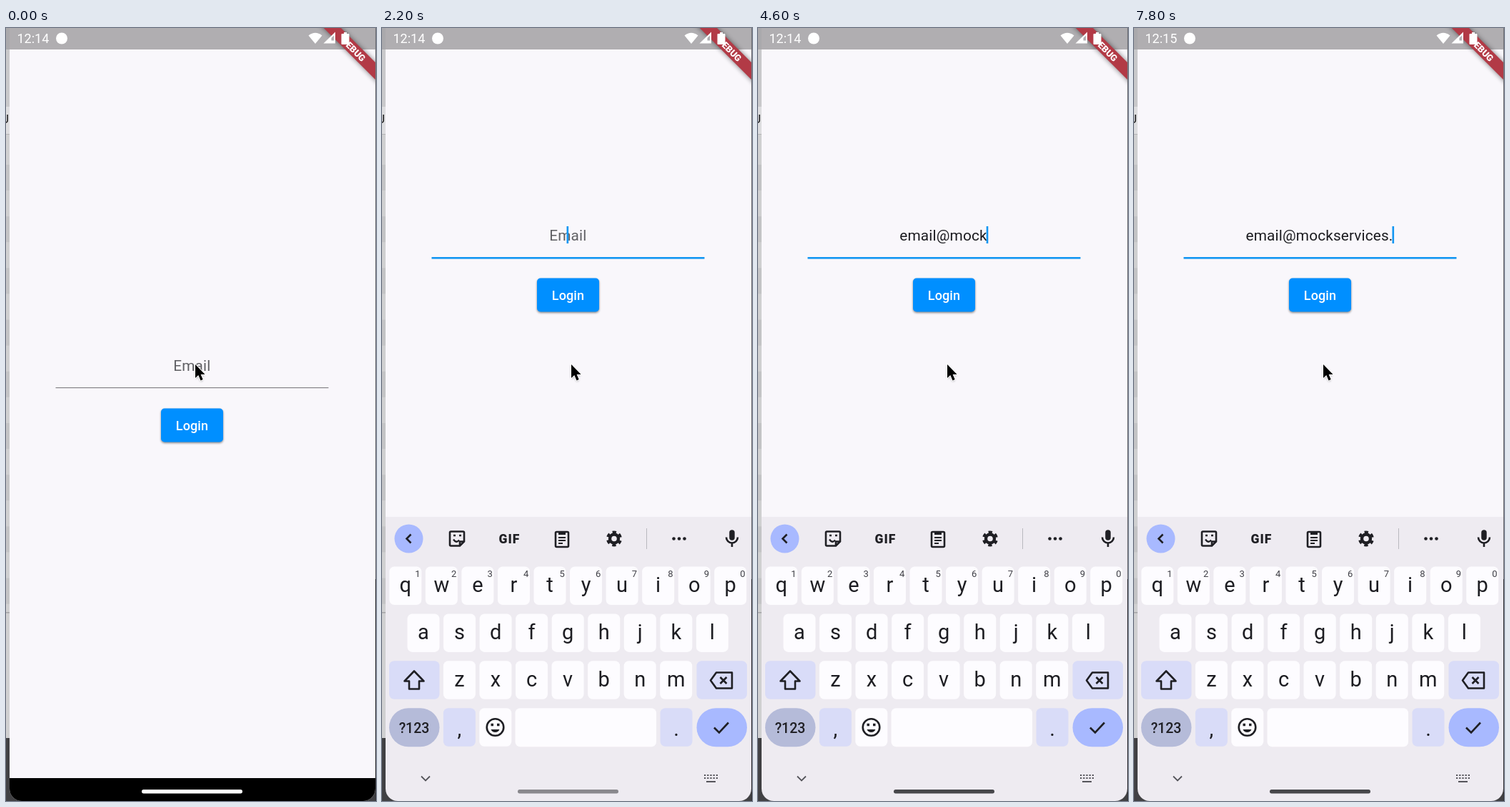
These frames come from a looping animation (518x1080 px, 8 s). An HTML page:

```html
<!DOCTYPE html>
<html lang="en">
<head>
<meta charset="utf-8">
<title>Login screen</title>
<style>
html, body { margin: 0; width: 100%; height: 100%; overflow: hidden; background: #d0d0d1; }
svg { display: block; width: 518px; height: 1080px; }
text { font-family: Roboto, sans-serif; }
.mid { text-anchor: middle; }
.line { fill: none; stroke: #1f1f24; stroke-width: 2.6; }
.field { font-size: 20.8px; letter-spacing: .15px; text-anchor: middle; }
.key { font-size: 29px; fill: #1d1d22; text-anchor: middle; }
.hint { font-size: 13px; fill: #3f3f46; text-anchor: middle; }
.word { font-size: 23.7px; fill: #2a2a30; text-anchor: middle; }
</style>
</head>
<body>
<svg viewBox="0 0 518 1080">
  <defs>
    <clipPath id="phone"><rect x="5" y="-30" width="512" height="1110" rx="17"/></clipPath>
    <filter id="soft" x="-30%" y="-60%" width="160%" height="220%"><feGaussianBlur stdDeviation="1.6"/></filter>
    <filter id="glow" x="-30%" y="-100%" width="160%" height="300%"><feGaussianBlur stdDeviation="3.5"/></filter>
  </defs>
  <g id="backdrop"></g>
  <g clip-path="url(#phone)">
    <rect x="5" width="512" height="1080" fill="#f9f7fb"/>
    <rect x="5" width="512" height="30" fill="#b0aeb1"/>
    <g id="form">
      <text id="label" class="field" x="260.3" y="478.5" fill="#606064">Email</text>
      <text id="entry" class="field" x="259.5" y="478.5" fill="#1c1c20"></text>
      <rect id="compose" y="480.5" height="1.3" fill="#1c1c20"/>
      <rect id="caret" y="459" width="2.6" height="24" fill="#1296f2"/>
      <rect id="rule" x="69.5" width="382"/>
      <rect x="217" y="533" width="87" height="47" rx="5" fill="#000" opacity=".45" filter="url(#soft)"/>
      <rect x="217" y="531.5" width="87" height="47" rx="5" fill="#008fff"/>
      <text class="mid" x="260.5" y="561.5" font-size="18" font-weight="500" letter-spacing=".1" fill="#fff">Login</text>
    </g>
    <rect x="5" y="1048" width="512" height="32" fill="#000"/>
    <g id="keyboard"></g>
    <g id="nav" fill="none" stroke="#55555b" stroke-width="1.8">
      <path d="M55 1045.5l6 6 6-6"/>
      <path d="M451 1044h19M451 1048h19" stroke-dasharray="2.2 2"/>
      <path d="M454 1053h13"/>
    </g>
    <rect id="handle" x="190" y="1064" width="141" height="5.5" rx="2.7"/>
    <g transform="translate(517 0) rotate(45)">
      <rect x="-60" y="34" width="120" height="17" fill="#000" opacity=".5" filter="url(#glow)"/>
      <rect x="-60" y="34" width="120" height="17" fill="#b23a46"/>
      <text class="mid" y="47.2" font-size="12.7" font-weight="900" fill="#fff">DEBUG</text>
    </g>
    <g fill="#fff">
      <text id="clock" x="15.5" y="21" font-size="18"></text>
      <circle cx="78" cy="14.5" r="8"/>
      <path d="M423.5 10.5q9.5-7.5 19 0L433 22z"/>
      <path d="M444.5 21.5L461 5.5v16z"/>
      <path d="M455.5 14l3.5-3.5v7h-3.5z" fill="#b0aeb1"/>
      <path d="M473 6h4v2h2.500q1 0 1 1v13q0 1-1 1h-9q-1 0-1-1v-13q0-1 1-1h2.500z"/>
    </g>
  </g>
  <rect x="517" width="1" height="770" fill="#737378"/>
  <rect x="517" y="770" width="1" height="310" fill="#303034"/>
  <g transform="translate(265 470)">
    <path id="arrow" d="M0 1.500v19l4.300-4 3.200 7.500 3.200-1.400-3.100-7.200h6z" opacity=".35" filter="url(#soft)"/>
    <path d="M0 0v19l4.300-4 3.200 7.500 3.200-1.400-3.100-7.200h6z" stroke="#fff" stroke-width="2" paint-order="stroke"/>
  </g>
</svg>
<script>
const $ = id => document.getElementById(id);
const rect = (x, y, w, h, fill, r = 0) =>
  `<rect x="${x}" y="${y}" width="${w}" height="${h}" rx="${r}" fill="${fill}"/>`;
const label = (cls, x, y, s) => `<text class="${cls}" x="${x}" y="${y}">${s}</text>`;
const at = (x, y, body) => `<g class="line" transform="translate(${x} ${y})">${body}</g>`;
const WHITE = '#fdfcff', LILAC = '#d9dcf8', BLUE = '#a8b9ff', INK = '#1f1f24';
const PITCH = 50.55;

// Window edge behind the phone
function backdrop() {
  let s = rect(0, 0, 8, 30, '#aaa9ac') + rect(0, 30, 8, 80, '#c9c9cb') +
    rect(0, 110, 8, 38, '#dddddf') + rect(0, 148, 8, 1, '#b5b5b7');
  for (let y = 191; y < 816; y += 72.2) s += rect(0, y, 8, 36, '#c4c4c6');
  s += rect(0, 816, 8, 1.5, '#a4a4a6') + rect(0, 992, 518, 88, '#414144');
  return s + '<text x="-6.500" y="133" font-size="16" fill="#111">U</text>';
}

function key(x, row, char, fill = WHITE, drop = 0) {
  const y = 752.5 + row * 65.9;
  return rect(x - 22.5, y, 45, 53.5, fill, 7) + label('key', x, y + 35.5 + drop, char);
}

function keyRow(chars, x, row) {
  return [...chars].map((c, i) => key(x + i * PITCH, row, c)).join('');
}

function toolbar() {
  return at(37.5, 713.5, '<path d="M3-6l-6 6 6 6"/>') +
    at(105, 713.5, `<path d="M-8.500-10h17q1.500 0 1.500 1.500V4l-6 6h-12.500q-1.500 0-1.500-1.500v-17q0-1.500 1.500-1.500zM10 4h-6v6"/>
      <path d="M-5 1q4 6 8 1M-5-4.500h3M3-4.500h3" stroke-width="2.300"/>`) +
    `<text class="mid" x="178.500" y="719.500" font-size="17.500" font-weight="900" letter-spacing="1" fill="${INK}">GIF</text>` +
    at(252, 714, `<rect x="-9" y="-10" width="18" height="21" rx="1.500"/>
      <path d="M-5-8.500h10" stroke-width="5"/><path d="M-5-2h10M-5 2h10M-5 6h6" stroke-width="2"/>`) +
    at(325, 713.5, `<circle r="6" stroke-width="4.400"/>
      <circle r="9" stroke-width="4" stroke-dasharray="5 4.425" stroke-dashoffset="2.500" transform="rotate(30)"/>`) +
    rect(370, 699, 1, 29, '#b9b8bf') +
    [-7.5, 0, 7.5].map(d => `<circle cx="${416 + d}" cy="713.5" r="2.3" fill="${INK}"/>`).join('');
}

function suggestions() {
  const mail = `<g fill="#edf7fd" stroke="#62b7e4" stroke-width="1.300">
    <rect x="-12.500" y="-9" width="25" height="18" rx="1"/>
    <path d="M-12.500 9l9-9M12.500 9l-9-9M-12.500-9l12.500 11 12.500-11"/></g>`;
  return at(37.5, 713.5, '<path d="M-3-6l6 6-6 6"/>') +
    '<text id="guess" class="word" x="119" y="723"></text>' + label('word', 259, 723, 'email') +
    [185, 333.5, 399.5].map(x => rect(x, 698, 1, 30, '#b9b8bf')).join('') +
    at(367, 713.5, mail) +
    at(433, 713.5, `<g transform="translate(3 0) skewX(-12) scale(.76)">${mail}</g>
      <path d="M-13-5h7M-11 0h5M-13 5h5" stroke="#c58b74" stroke-width="1.200"/>`);
}

function keyboard() {
  const row4 = 950.2;
  let s = rect(5, 683, 512, 420, '#eeebf1') + `<circle cx="37.500" cy="713.500" r="20" fill="${BLUE}"/>` +
    `<g id="tools">${toolbar()}</g><g id="words">${suggestions()}</g>` +
    at(490, 713, `<path d="M0-8v7" stroke-width="7.500" stroke-linecap="round"/>
      <path d="M-8-1.500a8 8 0 0 0 16 0M0 6.500v5.500"/>`);
  s += keyRow('qwertyuiop', 32.8, 0) + keyRow('asdfghjkl', 58, 1) + keyRow('zxcvbnm', 108.4, 2);
  s += [...'1234567890'].map((d, i) => label('hint', 50 + i * PITCH, 767, d)).join('');
  s += rect(10, 884.3, 70.5, 53.5, LILAC, 7) + rect(440.5, 884.3, 70.5, 53.5, LILAC, 7) +
    at(45, 911, '<path d="M0-12.500L13.500 1.500h-6.500v11h-14V1.500h-6.500z" stroke-linejoin="round"/>') +
    at(475, 911.5, `<path d="M-7-11h22v22h-22L-15 0z" stroke-linejoin="round"/>
      <path d="M-1.500-4.500l9 9M7.500-4.500l-9 9"/>`);
  s += rect(10, row4, 70.5, 54, '#b5bbd9', 27) + rect(440.5, row4, 70.5, 54, BLUE, 27) +
    rect(186.5, row4, 197.5, 54, WHITE, 7) + key(108.4, 3, ',', LILAC, 3) + key(158.8, 3, '') +
    key(412, 3, '.', LILAC, 3) +
    `<text class="mid" x="45" y="985" font-size="19.500" font-weight="500" fill="${INK}">?123</text>` +
    at(158.5, 977, `<circle r="11.800"/><path d="M-6 3a6.500 6.500 0 0 0 12 0z" fill="${INK}" stroke="none"/>
      <path d="M-6-3.500h3.500M2.500-3.500h3.500" stroke-width="3.500"/>`) +
    at(475, 977.5, '<path d="M-10 0l7 7L10-7"/>');
  return s;
}

$('backdrop').innerHTML = backdrop();
$('keyboard').innerHTML = keyboard();

// Time, keyboard offset, form offset
const slide = [[0, 400, 0], [1200, 190, -62], [1400, 43, -144.5], [1600, 0, -182]];
const address = 'email@mockservices.';
// Time, number of characters typed
const typing = [[0, 0], [1000, 0], [2400, 1], [2600, 2], [2800, 3], [3000, 4], [3200, 5], [3600, 6],
  [4000, 7], [4200, 8], [4400, 9], [4600, 10]];
for (let n = 11; n <= address.length; n++) typing.push([6200 + (n - 11) * 200, n]);
const latest = (table, t) => table.filter(row => row[0] <= t).pop();
const show = (id, on) => $(id).setAttribute('visibility', on ? 'visible' : 'hidden');
const set = (id, attrs) => { for (const a in attrs) $(id).setAttribute(a, attrs[a]); };

function draw(t) {
  const [, lift, shift] = latest(slide, t);
  const focused = t >= 1000;
  const [since, count] = latest(typing, t);
  const typed = address.slice(0, count);
  const composing = count > 0 && count < 6;

  set('keyboard', { transform: `translate(0 ${lift})` });
  set('form', { transform: `translate(0 ${shift})` });
  show('nav', t >= 1600);
  set('handle', { fill: t < 1200 ? '#fff' : t < 1600 ? '#dad9de' : t < 2400 ? '#89888d' : '#47474b' });

  show('label', !count);
  $('entry').textContent = typed;
  const width = count ? $('entry').getComputedTextLength() : 0;
  set('compose', { x: 259.5 - width / 2, width: composing ? width : 0 });
  set('caret', { x: 258.5 + width / 2 });
  show('caret', focused && (t - since) % 1000 < 500);
  set('rule', focused ? { y: 502, height: 2.6, fill: '#1296f2' } : { y: 502, height: 1.2, fill: '#858488' });

  show('tools', !composing);
  show('words', composing);
  $('guess').textContent = typed;
  $('clock').textContent = t < 7000 ? '12:14' : '12:15';
}

const start = performance.now();
function tick() {
  const t = (performance.now() - start) % 8000;
  draw(Math.floor(t / 200) * 200);
  requestAnimationFrame(tick);
}
tick();
</script>
</body>
</html>
```
